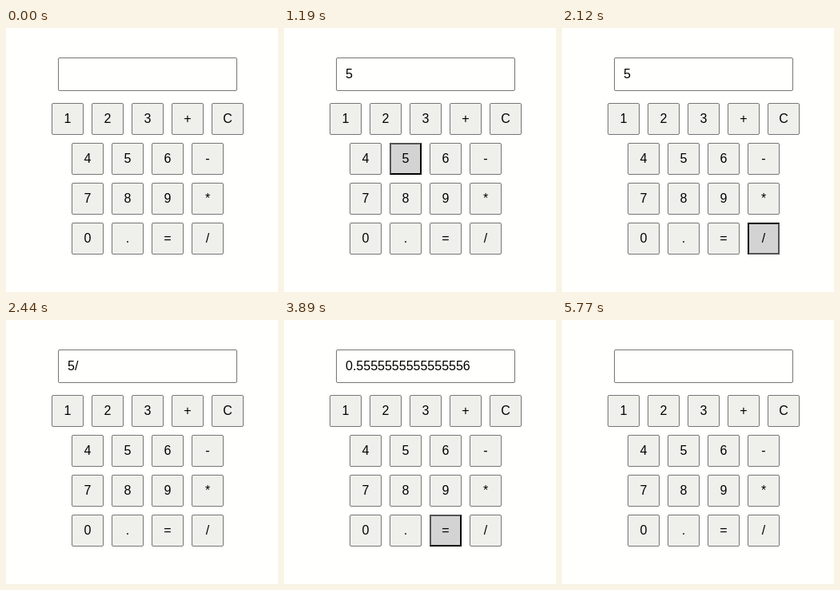
These frames come from a looping animation (340x331 px, 6360 ms). An HTML page:

```html
<!DOCTYPE html>
<html lang="en">
<head>
<meta charset="utf-8">
<title>Calculator</title>
<style>
  html, body { margin: 0; width: 100%; height: 100%; overflow: hidden; background: #fffffd; }
  body { position: relative; font: 16px "Liberation Sans", Arial, sans-serif; color: #000; }
  #display, .key { position: absolute; box-sizing: border-box; border: 1px solid #767676; border-radius: 2px; }
  #display { left: 65px; top: 37px; width: 224px; height: 42px; padding-left: 11px; line-height: 40px; white-space: pre; }
  .key { width: 40px; height: 40px; display: grid; place-items: center; line-height: 18px; background: #efefeb; }
  .key.hover { border: 2px outset #000; border-radius: 0; background: #d3d3d3; }
  .key.hover.down { border-style: inset; }
</style>
</head>
<body>
<div id="display"></div>
<script>
  const LOOP = 6360;
  const display = document.getElementById('display');
  const keys = {};

  ['123+C', '456-', '789*', '0.=/'].forEach((row, r) => {
    [...row].forEach((label, c) => {
      const key = document.createElement('div');
      key.textContent = label;
      key.style.left = (r ? 82 : 57) + 50 * c + 'px';
      key.style.top = 94 + 50 * r + 'px';
      document.body.append(key);
      keys[label] = key;
    });
  });

  // Pointer visits: key, enter, leave
  const visits = [
    ['9', 400, 460], ['8', 490, 540], ['5', 580, 1220],
    ['6', 1220, 1250], ['+', 1290, 1320], ['C', 1350, 1550],
    ['-', 1620, 1670], ['*', 1700, 1750], ['9', 1780, 1830], ['=', 1860, 1930],
    ['/', 1980, 2260], ['9', 2290, 2340], ['6', 2370, 2420], ['3', 2460, 2670],
    ['6', 2730, 3050], ['9', 3080, 3540], ['=', 3570, 4790],
    ['*', 4790, 4820], ['C', 5050, 5770]
  ];

  // Clicks: press, release, display text after release
  const clicks = [
    [1090, 1190, '5'], [2120, 2220, '5/'], [3290, 3390, '5/9'],
    [3770, 3890, String(5 / 9)], [5600, 5690, '']
  ];

  function draw(now) {
    const t = now % LOOP;
    const within = (from, to) => t >= from && t < to;
    const visit = visits.find(([, enter, leave]) => within(enter, leave));
    const pressed = clicks.some(([press, release]) => within(press, release));
    const done = clicks.filter(([, release]) => t >= release).pop();

    for (const label in keys) {
      const hover = visit && visit[0] === label;
      keys[label].className = 'key' + (hover ? ' hover' : '') + (hover && pressed ? ' down' : '');
    }
    display.textContent = done ? done[2] : '';
  }

  const start = performance.now();
  function tick() {
    draw(performance.now() - start);
    requestAnimationFrame(tick);
  }
  tick();
</script>
</body>
</html>
```
